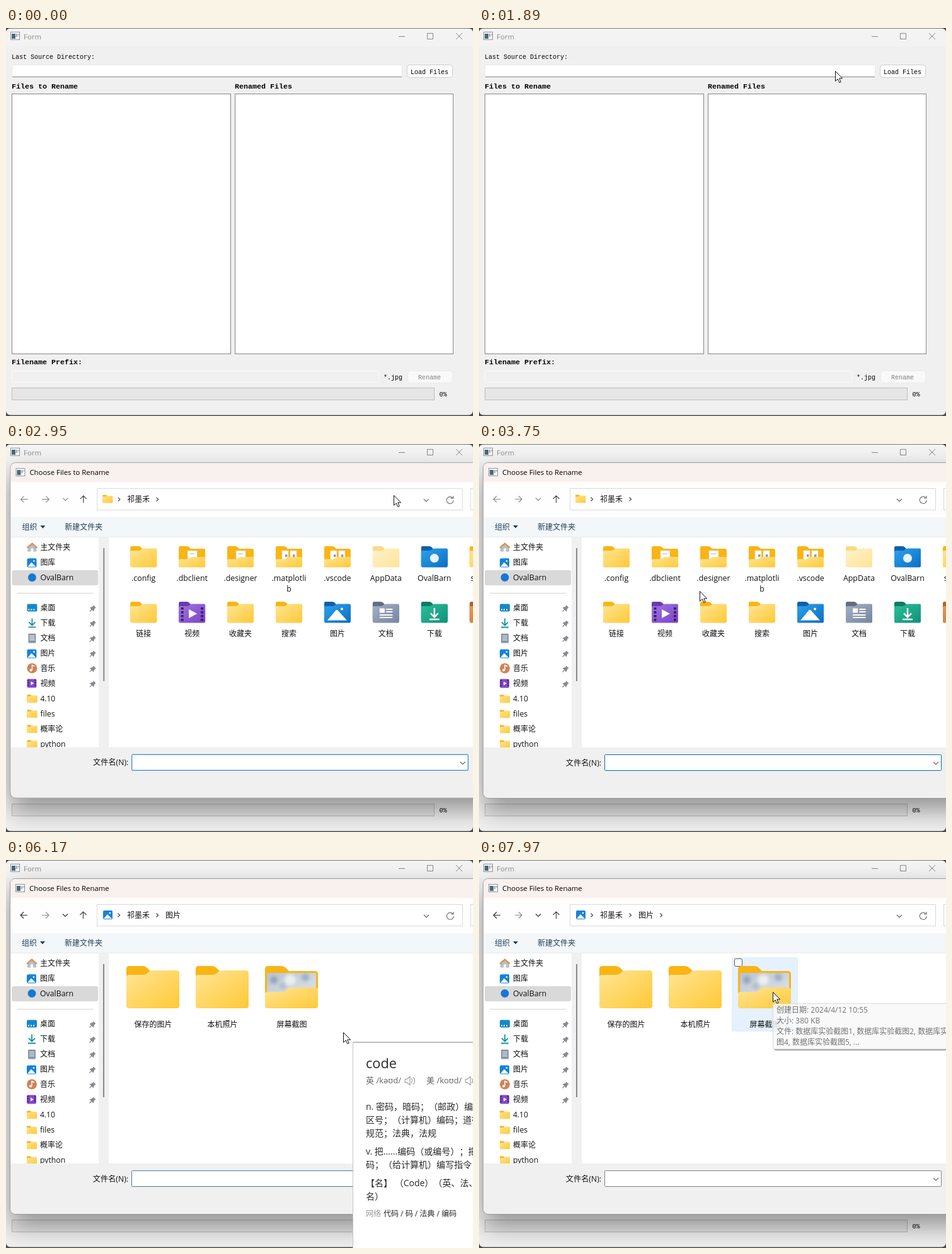
These frames come from a looping animation (741 px wide and 615 px high, 8000 ms). An HTML page:

```html
<!DOCTYPE html>
<html lang="zh">
<head>
<meta charset="utf-8">
<title>Choose Files to Rename</title>
<style>
html, body { margin: 0; width: 100%; height: 100%; overflow: hidden; background: #f0f0f0 }
svg { display: block; width: 741px; height: 615px }
text {
  font: 12px "Open Sans", "Noto Sans", "Noto Sans CJK SC", "Noto Sans CJK", sans-serif;
  white-space: pre; text-spacing-trim: space-all; font-feature-settings: "chws" 0, "halt" 0;
}
.mono { font: 10px "Liberation Mono", monospace }
.bold { font: bold 11.67px "Liberation Mono", monospace }
</style>
</head>
<body>
<svg id="stage" viewBox="0 0 741 615"></svg>
<script>
const LOOP = 8000;
const stage = document.getElementById('stage');

// ---- drawing helpers (all return markup) ----
const rect = (x, y, w, h, fill, stroke = 'none', rx = 0) =>
  `<rect x="${x}" y="${y}" width="${w}" height="${h}" fill="${fill}" stroke="${stroke}" rx="${rx}"/>`;
const shape = (d, fill) => `<path d="${d}" fill="${fill}"/>`;
const line = (d, color, width = 1, dash = 'none') =>
  `<path d="${d}" fill="none" stroke="${color}" stroke-width="${width}" stroke-dasharray="${dash}"/>`;
const circle = (x, y, r, fill) => `<circle cx="${x}" cy="${y}" r="${r}" fill="${fill}"/>`;
const text = (x, y, s, { size = 12, fill = '#111', anchor = 'start' } = {}) =>
  `<text x="${x}" y="${y}" fill="${fill}" text-anchor="${anchor}" style="font-size:${size}px">${s}</text>`;
const mono = (x, y, s, cls = 'mono', fill = '#000', anchor = 'start') =>
  `<text class="${cls}" x="${x}" y="${y}" fill="${fill}" text-anchor="${anchor}">${s}</text>`;
const group = (id, body, attrs = '') => `<g id="${id}" ${attrs}>${body}</g>`;
const at = (x, y, k, body, attrs = '') =>
  `<g transform="translate(${x} ${y}) scale(${k})" ${attrs}>${body}</g>`;
const gradient = (id, a, b) =>
  `<linearGradient id="${id}" x2="1" y2="1"><stop stop-color="${a}"/><stop offset="1" stop-color="${b}"/></linearGradient>`;
const chevron = (x, y, color = '#444') => line(`M${x - 1.5} ${y - 3}l3 3-3 3`, color, 1.2);
const dropArrow = (x, y, color = '#666') => line(`M${x - 4} ${y - 2}l4 4 4-4`, color, 1.2);
const checkbox = (x, y) => rect(x + .5, y + .5, 12, 12, '#fff', '#5a5560', 2);

// Folder on an 84 x 67 grid; contents peek out above a lowered front panel.
const folderFront = y =>
  `M0 ${y + 7}q0-4 4-4H26q5 0 9-4q3-3 8-3H80q4 0 4 4V63q0 4-4 4H4q-4 0-4-4z`;
function folder(x, y, k, { back = '#f9b415', front = 'yellow', inside = '', over = '', attrs = '' } = {}) {
  return at(x, y, k,
    shape('M0 5q0-5 5-5H26q4 0 7 3l5 5H79q5 0 5 5V60H0z', back) + inside +
    shape(folderFront(inside ? 38 : 11), `url(#${front})`) + over, attrs);
}

const sheet = x => rect(x, 14, 30, 40, '#fff', '#d9d9d9') + line(`M${x + 6} 24h16`, '#c8ccd2', 3);
const twoSheets = rect(20, 14, 20, 36, '#fff', '#ddd') + rect(46, 14, 20, 36, '#fff', '#ddd') +
  rect(30, 26, 7, 8, '#99a') + rect(54, 26, 7, 8, '#99a');
const photo = rect(3, 11, 78, 34, 'url(#photo)') +
  `<g filter="url(#soft)">${circle(14, 22, 6, '#93a4ba')}${circle(40, 22, 9, '#eceeef')}` +
  `${circle(64, 18, 6, '#9eafc4')}${circle(28, 32, 5, '#b3bcc6')}</g>`;
const mountain = circle(56, 23, 4, '#fff') + shape('M10 59L37 27q3-3 6 0L72 59z', '#fff');
const film = [7, 70].map(x => [18, 30, 42, 54].map(y => rect(x, y, 8, 7, '#37205f')).join('')).join('') +
  shape('M32 24L58 38L32 52z', '#fff');
const page = rect(22, 21, 16, 14, '#fff') + line('M43 24h20M43 32h20M22 42h41M22 50h41', '#fff', 4);
const arrowDown = line('M42 20V48M30 37L42 49L54 37M26 56H58', '#fff', 5);

const appIcon = (x, y) => rect(x + .5, y + .5, 14, 12, '#fbfbfb', '#8c949b') +
  rect(x + 2, y + 3, 6, 8, '#49697c') + rect(x + 9, y + 3, 2, 5, '#9aa5ad') + rect(x + 12, y + 3, 2, 3, '#b8c0c6');
const pictureIcon = (x, y) => rect(x, y, 15, 14, '#1683d8', 'none', 2) +
  circle(x + 11, y + 4, 1.3, '#fff') + shape(`M${x + 1} ${y + 13}l6-7 7 7z`, '#fff');

// ---- main window ----
function mainWindow() {
  const list = (x, w) => rect(x, 104.5, w, 412, '#fff', '#828790');
  return rect(0, 0, 741, 615, '#4d4d4d') + rect(0, .8, 741, 612.7, '#f0f0f0', 'none', 7) +
    shape('M0 29V8Q0 1 7 1H734Q741 1 741 8V29z', '#f3f3f3') +
    appIcon(7, 6) + text(28, 18, 'Form', { size: 11.4, fill: '#8a8a8a' }) +
    line('M623 13.5h10M668.5 8.5h9v9h-9zM714 8l10 10M724 8l-10 10', '#888') +
    mono(9, 49, 'Last Source Directory:') +
    rect(9.5, 58.5, 619, 19, '#fff', '#e8e8e8', 2) + line('M10 77.5H628', '#868686') +
    rect(636.5, 58.5, 72, 20, '#fdfdfd', '#d0d0d0', 4) +
    group('hotButton', rect(636.5, 58.5, 72, 20, '#e0eef9', '#0f7ac8', 4)) +
    mono(672, 73, 'Load Files', 'mono', '#000', 'middle') +
    mono(9, 96, 'Files to Rename', 'bold') + mono(363, 96, 'Renamed Files', 'bold') +
    list(9.5, 347) + list(363.5, 346) +
    mono(9, 533, 'Filename Prefix:', 'bold') +
    rect(9.5, 543.5, 582, 18, '#f0f0f0', '#f9f9f9', 2) + mono(599, 557, '*.jpg') +
    rect(637.5, 543.5, 71, 19, '#f9f9f9', '#ebebeb', 4) + mono(672, 557, 'Rename', 'mono', '#838383', 'middle') +
    rect(9.5, 570.5, 670, 19, '#e6e6e6', '#bcbcbc') + mono(687.5, 584, '0%');
}

// ---- file dialog ----
function sidebar() {
  const rowIcons = [
    y => shape(`M34 ${y}l7-6 7 6v7h-5v-5h-4v5h-5z`, '#b9bec4') + line(`M33 ${y + 1}l8-7 8 7`, '#d98b46', 2),
    y => rect(35, y - 7, 13, 13, '#9ccbf0', 'none', 2) + pictureIcon(33, y - 6),
    y => circle(41, y, 6.5, '#1478d4'),
    y => rect(33, y - 6, 16, 12, '#1688c9', 'none', 2) + line(`M35 ${y + 3}h2m2 0h2m2 0h2`, '#fff', 2),
    y => line(`M41 ${y - 7}v11M36 ${y - 1}l5 5 5-5M35 ${y + 7}h12`, '#15939a', 1.8),
    y => rect(35, y - 7, 12, 15, '#8997a8', 'none', 1) + line(`M37 ${y - 3}h8m-8 3h8m-8 3h8`, '#fff', 1.2),
    y => pictureIcon(33, y - 6),
    y => circle(41, y, 8, '#cf8358') + circle(39, y + 3, 2, '#fff') + line(`M41 ${y + 3}v-8l4 2`, '#fff', 1.4),
    y => rect(33, y - 7, 15, 14, '#8247c8', 'none', 2) +
      line(`M35 ${y - 6}v12M46 ${y - 6}v12`, '#3d1d6c', 2, 2) + shape(`M39 ${y - 3}l5 3-5 3z`, '#fff')
  ];
  const names = ['主文件夹', '图库', 'OvalBarn', '', '桌面', '下载', '文档', '图片', '音乐', '视频', '4.10', 'files', '概率论', 'python'];
  let icon = 0;
  const rows = names.map((name, i) => {
    if (!name) return '';
    const y = 163.5 + i * 24;
    const glyph = icon < rowIcons.length ? rowIcons[icon++](y) : folder(33, y - 6, .19);
    const pin = i > 3 && i < 10
      ? at(137.5, y + 1, 1, line('M-1 1l-4 4', '#858b92', 1.3) + shape('M1-5l4 4-2 1-2 5-6-6 5-2z', '#858b92')) : '';
    return glyph + text(54, y + 4.5, name, { size: /[a-z]/.test(name) ? 12.3 : 12 }) + pin;
  }).join('');
  return rect(147, 148, 16, 334, '#f0f0f0') + line('M155 165V376', '#8a8a8a', 2) +
    rect(9, 200, 137, 24, '#d9d9d9', 'none', 3) + line('M17 236.5H138', '#d4d4d4') + rows;
}

const cellX = col => 181 + 77 * col;
function homeFiles() {
  const items = [
    ['.config'], ['.dbclient', { inside: sheet(28) }], ['.designer', { inside: sheet(28) }],
    ['.matplotli', { inside: twoSheets }], ['.vscode', { inside: twoSheets }], ['AppData', { attrs: 'opacity=".5"' }],
    ['OvalBarn', { back: '#0f5fae', front: 'blue', over: circle(42, 38, 14, '#e6f3fd') }], ['source'],
    ['链接'], ['视频', { back: '#6a3bb0', front: 'purple', over: film }], ['收藏夹'], ['搜索'],
    ['图片', { back: '#0f5fae', front: 'blue', over: mountain }],
    ['文档', { back: '#5f6d86', front: 'slate', over: page }],
    ['下载', { back: '#0d7c64', front: 'green', over: arrowDown }],
    ['音乐', { back: '#b5622c', front: 'orange' }]
  ];
  return items.map(([name, look], i) => {
    const x = cellX(i % 8) + 37, y = i < 8 ? 162 : 250;
    return folder(x - 21, y, .5, look) +
      text(x, y + 55, name, { anchor: 'middle', size: i < 8 ? 12.4 : 12 });
  }).join('') + text(449, 234, 'b', { anchor: 'middle', size: 12.4 });
}

function pictureFiles() {
  return ['保存的图片', '本机照片', '屏幕截图'].map((name, i) =>
    folder(191 + 110 * i, 168, 1, i === 2 ? { inside: photo } : {}) +
    text(233.5 + 110 * i, 264.5, name, { anchor: 'middle' })).join('');
}

function dialog() {
  return `<rect x="7" y="48" width="846" height="532" rx="8" opacity=".4" filter="url(#blur)"/>` +
    rect(6.5, 29.5, 846, 532, '#f0f0f0', '#9c9c9c', 8) +
    shape('M7 60V38Q7 30 15 30H853V60z', '#f9f1ee') + rect(7, 60, 846, 56, '#fefefe') +
    rect(7, 116, 846, 32, '#f4f7f9') + rect(7, 148, 846, 334, '#fff') + line('M7 147.5H853', '#e8ebed') +
    appIcon(15, 38) + text(37, 49, 'Choose Files to Rename', { size: 11.4, fill: '#000' }) +
    group('back', '<path d="M34 87.5H23M28 82.5l-5 5 5 5"/><path d="M90 85.5l4 4 4-4"/>', 'fill="none" stroke-width="1.2"') +
    line('M57 87.5h11M63 82.5l5 5-5 5', '#8c8c8c', 1.2) + line('M122.5 93V82M117.5 87l5-5 5 5', '#444', 1.2) +
    rect(144.5, 70.5, 580, 34, '#fff', '#d9d9d9') + rect(737.5, 70.5, 100, 34, '#fff', '#d9d9d9') +
    chevron(179, 87.5) + text(192, 91.5, '祁墨禾') + chevron(240, 87.5) +
    dropArrow(667, 89) + line('M709.5 86a5.5 5.5 0 1 0 .8 3M710 82v4h-4', '#777', 1.2) +
    text(25, 136, '组织', { fill: '#1c3d5c' }) + shape('M54 129h8l-4 4.5z', '#1c3d5c') +
    text(93, 136, '新建文件夹', { fill: '#1c3d5c' }) +
    group('contents', sidebar() +
      group('hover', rect(0, 242, 74, 70, '#e5f3ff') + checkbox(4, 244)) +
      group('home', folder(153, 80.5, .19) + homeFiles()) +
      group('pictures', pictureIcon(154, 80) + text(253, 91.5, '图片') +
        group('lastChevron', chevron(289, 87.5)) +
        group('bigHover', rect(401, 154, 105, 118, '#e5f1fc') + checkbox(405, 156)) + pictureFiles())) +
    rect(7, 481, 846, 72, '#f0f0f0') +
    text(194, 509.5, '文件名(N):', { anchor: 'end', size: 12.2 }) +
    `<rect id="field" x="199.5" y="492.5" width="534" height="25" rx="1" fill="#fff"/>` + dropArrow(725, 506) +
    group('caret', line('M203.5 497V514', '#000'));
}

function dictionary() {
  const gray = '#666', ink = '#2b2b2b';
  const speaker = x =>
    line(`M${x} 347.5h3l5-4v13l-5-4h-3zM${x + 10} 346q3 4 0 8M${x + 13} 344q5 6 0 12`, '#999', 1.1);
  const lines = [[396, 'n. 密码，暗码；（邮政）编码，'], [417, '区号；（计算机）编码；道德'], [438, '规范；法典，法规'],
    [467, 'v. 把......编码（或编号）；把'], [488, '码；（给计算机）编写指令'],
    [517, '【名】 （Code）（英、法、西'], [538, '名）']];
  return rect(550.5, 289.5, 300, 400, '#fff', '#c4c4c4') + line('M551 289H741', '#bdbdbd', 2) +
    text(571, 330, 'code', { size: 21.7, fill: ink }) +
    text(571, 354, '英 /kəʊd/', { size: 13, fill: gray }) + speaker(633) +
    text(667, 354, '美 /koʊd/', { size: 13, fill: gray }) + speaker(729) +
    lines.map(([y, s]) => text(571, y, s, { size: 14, fill: ink })).join('') +
    text(571, 565, '网络', { fill: '#999' }) + text(599, 565, '代码 / 码 / 法典 / 编码', { fill: ink });
}

function tooltip() {
  const lines = ['创建日期: 2024/4/12 10:55', '大小: 380 KB',
    '文件: 数据库实验截图1, 数据库实验截图2, 数据库实验截图3, 数据库实验截', '图4, 数据库实验截图5, ...'];
  return rect(468, 229, 300, 73, '#999', 'none', 3) + rect(466.5, 227.5, 300, 72, '#f9f9f9', '#d5d5d5', 3) +
    lines.map((s, i) => text(472, 242 + 17 * i, s, { fill: '#575757' })).join('');
}

stage.innerHTML = '<defs>' +
  gradient('yellow', '#ffe596', '#ffc936') + gradient('blue', '#2ba4ea', '#0f6cc4') +
  gradient('purple', '#a274e6', '#7a43c6') + gradient('slate', '#a3b0c5', '#7685a0') +
  gradient('green', '#2cc09a', '#119078') + gradient('orange', '#e39a5c', '#c8743a') +
  gradient('photo', '#b9c4d1', '#dde3e9') +
  '<filter id="blur" x="-10%" y="-15%" width="120%" height="130%"><feGaussianBlur stdDeviation="20"/></filter>' +
  '<filter id="soft"><feGaussianBlur stdDeviation="2.5"/></filter></defs>' +
  mainWindow() + group('dialog', dialog()) + group('dictionary', dictionary()) + group('tooltip', tooltip()) +
  group('cursor', '<path d="M.5.5V16.2L4.2 12.8L6.8 18.5L9.2 17.4L6.7 11.9H11.6z" fill="#fff" stroke="#111"/>');

// ---- motion ----
const $ = Object.fromEntries([...stage.querySelectorAll('[id]')].map(e => [e.id, e]));
const show = (el, on) => el.setAttribute('display', on ? 'inline' : 'none');
const ramp = (t, a, b) => Math.min(1, Math.max(0, (t - a) / (b - a)));
const mix = (a, b, k) => a + (b - a) * k;

// time, x, y of the pointer tip
const path = [
  [370, 673, 596], [520, 480, 505], [600, 405, 462], [720, 305, 395], [960, 19, 215], [1080, 29, 147],
  [1160, 40, 125], [1180, 40, 125], [1970, 623, 62], [2080, 623, 62], [2300, 650, 69], [2800, 650, 69],
  [3420, 508, 117], [3530, 508, 120], [3750, 351, 233], [3860, 225, 270], [4190, 562, 284], [4330, 562, 284],
  [4800, 586, 274], [5100, 586, 274], [5350, 535, 273], [6400, 535, 273], [7190, 442, 191], [7210, 442, 191],
  [7530, 466, 209], [LOOP, 466, 209]
];
function pointer(t) {
  const i = Math.max(1, path.findIndex(p => p[0] > t));
  const [a, b] = [path[i - 1], path[i]], k = ramp(t, a[0], b[0]);
  return [mix(a[1], b[1], k), mix(a[2], b[2], k)];
}

function draw(t) {
  const [x, y] = pointer(t);
  show($.cursor, t >= 370);
  $.cursor.setAttribute('transform', `translate(${Math.round(x)} ${Math.round(y)})`);
  $.hotButton.setAttribute('opacity', ramp(t, 2120, 2320));

  const grow = 1 - (1 - ramp(t, 2745, 3000)) ** 3;
  const scale = mix(.85, 1, grow);
  show($.dialog, t >= 2740);
  $.dialog.setAttribute('opacity', ramp(t, 2748, 2940));
  $.dialog.setAttribute('transform', `translate(430 ${mix(290, 296, grow)}) scale(${scale}) translate(-430 -296)`);
  show($.contents, t >= 2850);

  const opened = t >= 5860;
  show($.home, !opened);
  show($.pictures, opened);
  show($.lastChevron, t >= 6430);
  $.back.setAttribute('stroke', opened ? '#333' : '#8c8c8c');
  const blur = ramp(t, 6080, 6240);
  $.field.setAttribute('stroke', `rgb(${mix(0, 128, blur)},${mix(110, 128, blur)},${mix(192, 128, blur)})`);
  show($.caret, t >= 3010 && t < 5300 && Math.floor((t - 3010) / 530) % 2 === 0);

  const col = Math.floor((x - cellX(0)) / 77);
  show($.hover, !opened && t > 3500 && y >= 242 && y < 312 && x - cellX(col) < 74);
  $.hover.setAttribute('transform', `translate(${cellX(col)} 0)`);
  show($.bigHover, x >= 401 && x < 506 && y >= 154 && y < 272);

  show($.dictionary, t >= 6080 && t < 6410);
  $.tooltip.setAttribute('opacity', ramp(t, 7820, 8000));
}

function frame() {
  draw(performance.now() % LOOP);
  requestAnimationFrame(frame);
}
frame();
</script>
</body>
</html>
```
